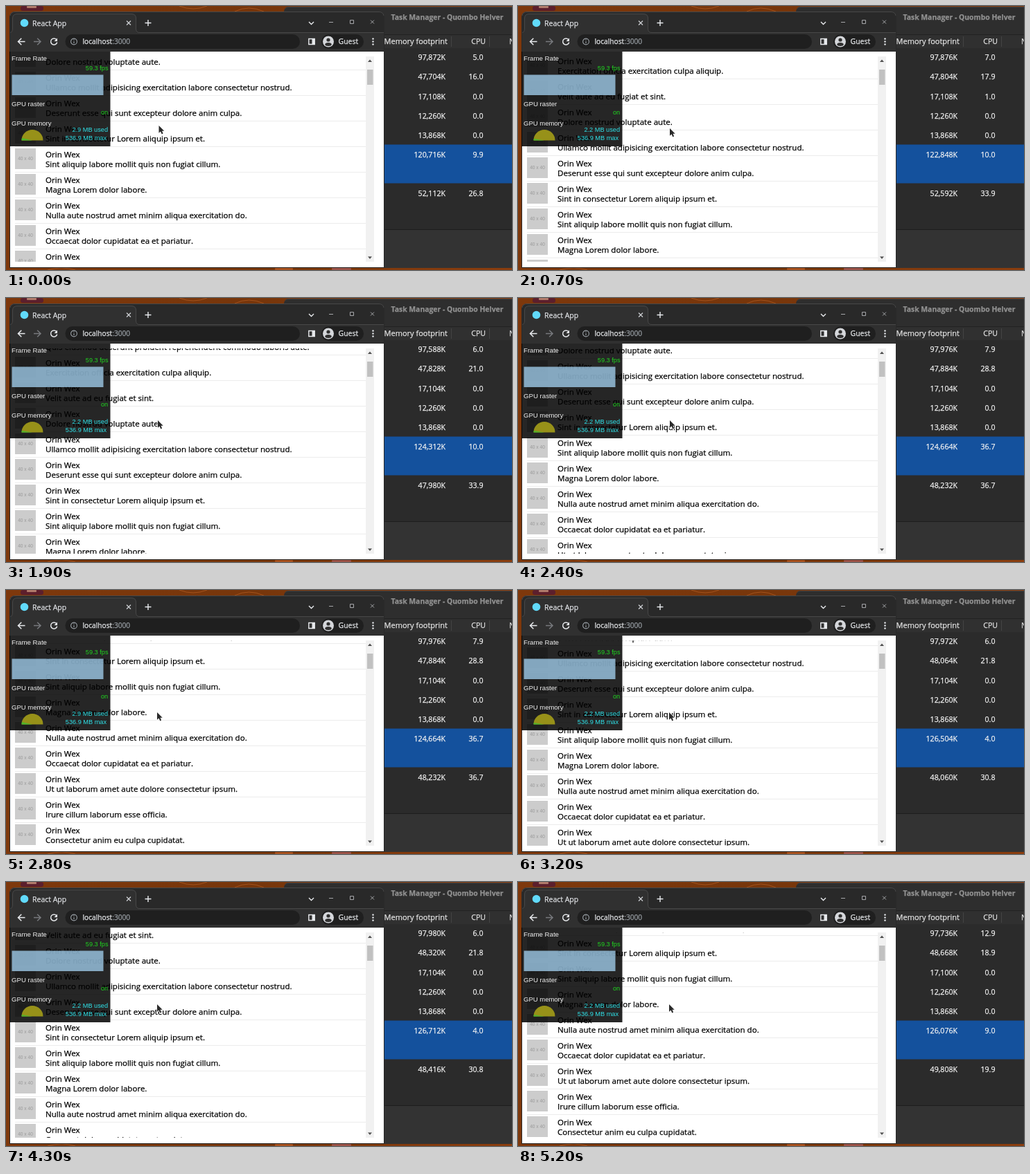
An HTML page with a canvas that plays this animation: 730 px wide and 382 px high, repeating every 5300 ms.

```html
<!DOCTYPE html>
<html lang="en">
<head>
<meta charset="utf-8">
<title>Virtual list</title>
<style>
html, body { margin: 0; width: 100%; height: 100%; overflow: hidden; background: #7c380c; }
canvas { display: block; width: 730px; height: 382px; }
</style>
</head>
<body>
<canvas id="stage" width="730" height="382"></canvas>
<script>
const ctx = document.getElementById('stage').getContext('2d');
const UI = '"Open Sans", "Noto Sans", sans-serif';
const HUD = '"Liberation Sans", Arial, sans-serif';
const LOOP = 5300, STEP = 100, PITCH = 37;

const lines = [
  'Quis eiusmod deserunt proident reprehenderit commodo laboris aute.',
  'Exercitation officia exercitation culpa aliquip.',
  'Velit aute ad eu fugiat et sint.',
  'Dolore nostrud voluptate aute.',
  'Ullamco mollit adipisicing exercitation labore consectetur nostrud.',
  'Deserunt esse qui sunt excepteur dolore anim culpa.',
  'Sint in consectetur Lorem aliquip ipsum et.',
  'Sint aliquip labore mollit quis non fugiat cillum.',
  'Magna Lorem dolor labore.',
  'Nulla aute nostrud amet minim aliqua exercitation do.',
  'Occaecat dolor cupidatat ea et pariatur.',
  'Ut ut laborum amet aute dolore consectetur ipsum.',
  'Irure cillum laborum esse officia.',
  'Consectetur anim eu culpa cupidatat.',
  'Aliqua tempor veniam sit elit.'
];

// [time, y of the eighth entry's second line]
const scroll = [[0, 229], [700, 316], [1100, 236], [1500, 291], [1900, 330],
  [2400, 224], [2800, 140], [3300, 240], [3700, 312], [4000, 318], [4800, 140]];

// start | memory per task | cpu per task
const stats = [
  '0|97,872 47,704 17,108 12,260 13,868 120,716 52,112|5.0 16.0 0.0 0.0 0.0 9.9 26.8',
  '200|97,876 47,804 17,108 12,260 13,868 122,848 52,592|7.0 17.9 1.0 0.0 0.0 10.0 33.9',
  '1200|97,588 47,828 17,104 12,260 13,868 124,312 47,980|6.0 21.0 0.0 0.0 0.0 10.0 33.9',
  '2200|97,976 47,884 17,104 12,260 13,868 124,664 48,232|7.9 28.8 0.0 0.0 0.0 36.7 36.7',
  '3200|97,972 48,064 17,104 12,260 13,868 126,504 48,060|6.0 21.8 0.0 0.0 0.0 4.0 30.8',
  '4200|97,980 48,320 17,104 12,260 13,868 126,712 48,416|6.0 21.8 0.0 0.0 0.0 4.0 30.8',
  '5200|97,736 48,668 17,100 12,260 13,868 126,076 49,808|12.9 18.9 0.0 0.0 0.0 9.0 19.9'
].map(s => {
  const [start, mem, cpu] = s.split('|');
  return { start: +start, mem: mem.split(' '), cpu: cpu.split(' ') };
});

function box(x, y, w, h, color) {
  ctx.fillStyle = color;
  ctx.fillRect(x, y, w, h);
}

function round(x, y, w, h, r, color) {
  ctx.fillStyle = color;
  ctx.beginPath();
  ctx.roundRect(x, y, w, h, r);
  ctx.fill();
}

function disc(x, y, r, color) {
  ctx.fillStyle = color;
  ctx.beginPath();
  ctx.arc(x, y, r, 0, Math.PI * 2);
  ctx.fill();
}

function poly(points, color) {
  ctx.fillStyle = color;
  ctx.beginPath();
  points.forEach(([x, y]) => ctx.lineTo(x, y));
  ctx.closePath();
  ctx.fill();
}

function stroke(d, color, width = 1.4) {
  ctx.strokeStyle = color;
  ctx.lineWidth = width;
  ctx.stroke(new Path2D(d));
}

function text(s, x, y, size, color, align = 'left', weight = 400) {
  ctx.font = `${weight} ${size}px ${UI}`;
  ctx.fillStyle = ctx.strokeStyle = color;
  ctx.textAlign = align;
  ctx.fillText(s, x, y);
  // A hairline gives the slightly heavier stems of the desktop font
  ctx.lineWidth = 0.25;
  ctx.strokeText(s, x, y);
}

function label(s, x, y, size, color, align = 'left') {
  ctx.font = `${size}px ${HUD}`;
  ctx.fillStyle = color;
  ctx.textAlign = align;
  ctx.fillText(s, x, y);
}

// Monotone cubic through the key points
function curve(keys, t) {
  const n = keys.length;
  if (t >= keys[n - 1][0]) return keys[n - 1][1];
  let i = 0;
  while (t >= keys[i + 1][0]) i++;
  const slope = k => (keys[k + 1][1] - keys[k][1]) / (keys[k + 1][0] - keys[k][0]);
  const tangent = k => {
    if (k === 0) return slope(0);
    if (k === n - 1) return 0;
    const a = slope(k - 1), b = slope(k);
    return a * b <= 0 ? 0 : 2 * a * b / (a + b);
  };
  const [t0, y0] = keys[i], [t1, y1] = keys[i + 1];
  const h = t1 - t0, u = (t - t0) / h, v = 1 - u;
  return y0 * (1 + 2 * u) * v * v + tangent(i) * h * u * v * v +
    y1 * u * u * (3 - 2 * u) - tangent(i + 1) * h * u * u * v;
}

function drawDesktop() {
  const g = ctx.createLinearGradient(0, 0, 730, 0);
  g.addColorStop(0, '#7e380c');
  g.addColorStop(0.5, '#77360b');
  g.addColorStop(1, '#8a3d0e');
  box(0, 0, 730, 382, g);
  round(21, 0, 33, 7, 3, '#5c1f2c');
  round(30, 0, 14, 3, 1, '#b07a6a');
  stroke('M250 0Q270 8 290 0M330 8Q350 -2 372 8M60 382Q80 376 100 382', '#a3521c', 1);
  round(388, 379, 26, 3, 1, '#a8521f');
  round(470, 379, 28, 3, 1, '#9c5348');
}

function drawTasks(t) {
  round(401, 1, 340, 378, [7, 0, 0, 0], '#2e2e2e');
  stroke('M403 3.5Q404 1.5 408 1.5H730', '#424242', 1);
  text('Task Manager - Quombo Helver', 636.5, 20, 10.4, '#919191', 'center', 700);
  box(546, 41, 184, 1, '#222');
  box(546, 42, 184, 19, '#303030');
  box(546, 61, 184, 262, '#2b2b2b');
  box(642, 44, 1, 15, '#444');
  box(697, 44, 1, 15, '#444');
  text('Memory footprint', 637, 55, 11, '#e4e4e4', 'right');
  text('CPU', 692, 55, 10.6, '#e4e4e4', 'right');
  text('N', 726, 55, 10.6, '#e4e4e4');
  box(546, 200.5, 184, 56, '#14519d');
  const now = stats.filter(s => s.start <= t).pop();
  now.mem.forEach((m, i) => {
    const y = (i === 6 ? 271 : 74.4 + i * 28.15) + 3.8;
    text(m + 'K', 634, y, 10.6, '#f4f4f4', 'right');
    text(now.cpu[i], 688.5, y, 10.6, '#f4f4f4', 'right');
  });
  box(546, 323, 184, 1, '#1d1d1d');
  box(546, 324, 184, 55, '#333');
}

function drawBrowser() {
  const bar = '#303030', icon = '#e8eaed';
  round(5, 8, 541, 371, [8, 8, 0, 0], '#292929');
  stroke('M6 14Q7 8.5 13 8.5H538Q544 8.5 545 14', '#484848', 1);
  box(6, 38, 539, 28, bar);
  round(9, 11, 179, 28, [7, 7, 0, 0], bar);
  stroke('M6 38.5Q9.5 38 9.5 33V18Q9.5 11.5 16 11.5H181Q187.5 11.5 187.5 18V33Q187.5 38.5 193 38.5H545',
    '#484848', 1);
  box(6, 66, 539, 312, '#fff');

  disc(26.5, 24.5, 5.8, '#61dafb');
  text('React App', 38, 28.5, 10.5, '#dfe1e5');
  stroke('M174 21.5l6 6m0-6l-6 6', '#d0d2d6', 1.2);
  stroke('M200.5 24.5h9m-4.5-4.5v9', icon);
  stroke('M437 23l3.5 3.5l3.5-3.5', icon);
  stroke('M466 23.5h6M496.5 20.5h5v5h-5zM526 20.5l5 5m0-5l-5 5', '#a6a7aa', 1);

  stroke('M27.5 51.5h-10m4.8-4.8l-4.8 4.8l4.8 4.8', icon, 1.5);
  stroke('M40 51.5h10m-4.8-4.8l4.8 4.8l-4.8 4.8', '#77797d', 1.5);
  stroke('M72.8 48.6a4.6 4.6 0 1 0 .9 3.9', icon, 1.5);
  poly([[74, 46.5], [74, 51], [69.5, 51]], icon);

  round(85.5, 41, 338.5, 21, 10.5, '#1f1f1f');
  stroke('M102.4 51.5a4.4 4.4 0 1 0 -8.8 0a4.4 4.4 0 1 0 8.8 0M98 51v3M98 48.6v1.2', '#9aa0a6', 1.1);
  text('localhost', 110.5, 55.2, 10.2, icon);
  text(':3000', 110.5 + ctx.measureText('localhost').width, 55.2, 10.2, '#9aa0a6');

  stroke('M436.8 47.5h8.4v8h-8.4z', icon);
  box(441.5, 47, 4, 9, icon);
  round(455, 41, 61, 21, 10.5, '#1f1f1f');
  disc(465, 51.5, 8, '#d5d7db');
  disc(465, 49, 2.6, bar);
  ctx.beginPath();
  ctx.ellipse(465, 55.6, 4.7, 2.5, 0, 0, Math.PI * 2);
  ctx.fill();
  text('Guest', 479.5, 55.2, 10.5, icon);
  for (const y of [47.5, 51.5, 55.5]) disc(529.5, y, 1.2, icon);
}

function drawList(t) {
  const top = Math.round(curve(scroll, t)) - 7 * PITCH;
  ctx.save();
  ctx.beginPath();
  ctx.rect(13, 73, 518, 297);
  ctx.clip();
  lines.forEach((line, i) => {
    const y = top + i * PITCH;
    if (y < 50 || y > 400) return;
    box(13, y - 23, 30, 30, '#ccc');
    label('40 x 40', 28, y - 5.6, 6.6, '#999', 'center');
    text('Orin Wex', 57, y - 9.6, 11.55, '#000');
    text(line, 57, y + 4, 11.55, '#000');
    box(13, y + 11, 506, 1, '#ececec');
  });
  box(519, 73, 12, 297, '#f1f1f1');
  box(521, 92, 8.5, 22, '#c1c1c1');
  poly([[522, 81], [528, 81], [525, 77.5]], '#505050');
  poly([[522, 362.5], [528, 362.5], [525, 366]], '#505050');
  ctx.restore();
}

function drawMeter(t) {
  const busy = t < 400 || (t >= 1100 && t < 1900) || (t >= 2500 && t < 3200);
  const green = '#1fd61f', cyan = '#2fe3ea', white = '#f0f0f0';
  box(5, 66, 145.5, 137, 'rgba(0,0,0,.85)');
  label('Frame Rate', 8, 79, 9.66, white);
  label('59.3 fps', 147.5, 93.2, 9.2, green, 'right');
  box(8.5, 99.5, 132, 29.5, 'rgba(165,211,243,.75)');
  label('GPU raster', 8, 145.4, 9.66, white);
  label('on', 147.2, 157, 9.2, green, 'right');
  label('GPU memory', 8, 172.6, 9.5, white);
  label(busy ? '2.9 MB used' : '2.2 MB used', 147, 182, 9.2, cyan, 'right');
  label('536.9 MB max', 145, 193.6, 9.2, cyan, 'right');
  const wedge = (end, color) => {
    ctx.fillStyle = color;
    ctx.beginPath();
    ctx.moveTo(38, 194.5);
    ctx.arc(38, 194.5, 15.5, Math.PI, end);
    ctx.fill();
  };
  wedge(Math.PI * 2, '#979119');
  wedge(Math.PI * (busy ? 1.07 : 1.05), '#4fb52b');
}

function drawPointer(t) {
  const [x, y] = t < 200 ? [220.5, 173] : t < 2500 ? [219, 177] : [218, 177];
  const arrow = new Path2D('M0 0V10.8L2.5 8.6L4.3 12.5L6.1 11.6L4.5 7.8H7.7Z');
  ctx.save();
  ctx.translate(x, y);
  ctx.strokeStyle = '#fff';
  ctx.lineWidth = 1.4;
  ctx.stroke(arrow);
  ctx.fillStyle = '#2a2a2a';
  ctx.fill(arrow);
  ctx.restore();
}

const origin = performance.now();
function frame() {
  const elapsed = Math.max(0, performance.now() - origin) % LOOP;
  const t = Math.floor(elapsed / STEP) * STEP;
  drawDesktop();
  drawTasks(t);
  drawBrowser();
  drawList(t);
  drawMeter(t);
  drawPointer(t);
  requestAnimationFrame(frame);
}
frame();
</script>
</body>
</html>
```
